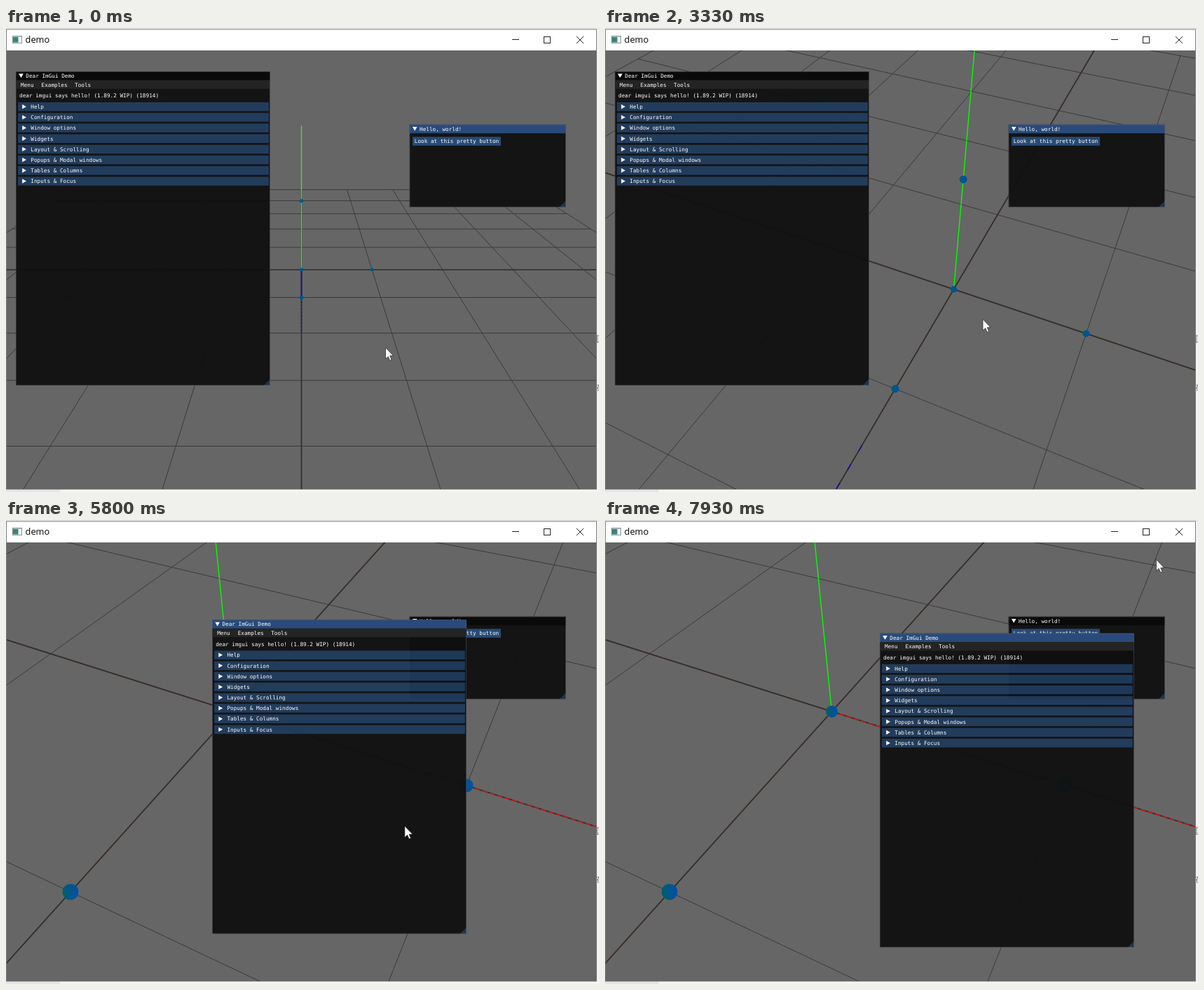
An HTML page with a canvas that plays this animation: 846 by 662 pixels, repeating every 8 s.

```html
<!DOCTYPE html>
<html lang="en">
<head>
<meta charset="utf-8">
<title>demo</title>
<style>
html, body { margin: 0; width: 100%; height: 100%; overflow: hidden; background: #f2f2f2; }
canvas { display: block; }
</style>
</head>
<body>
<canvas id="stage" width="846" height="662"></canvas>
<script>
const g = document.getElementById('stage').getContext('2d');
const LOOP = 8000, FOCAL = 860, CX = 421.5, CY = 344.8, NEAR = 0.1;
const MONO = '7.69px "DejaVu Sans Mono", monospace';
const SECTIONS = ['Help', 'Configuration', 'Window options', 'Widgets', 'Layout & Scrolling',
  'Popups & Modal windows', 'Tables & Columns', 'Inputs & Focus'];

// azimuth and elevation in degrees, distance, screen offset of the origin
const VIEW = [0, 20.56, 8.544, 0, 0];
const ORBIT = [
  { from: 70, to: 1200, goal: [-0.57, 44.2, 8.544, 0, 0] },
  { from: 1270, to: 2330, goal: [25.8, 43.6, 8.544, 0, 0] },
  { from: 2530, to: 3330, goal: [25.8, 43.6, 4.54, 76, 28] },
  { from: 3530, to: 5000, goal: [25.8, 43.6, 2.545, -98, -71.6] }
];
const DRAG = [
  { from: 5470, to: 5800, goal: [293.5, 142.3] },
  { from: 5800, to: 6070, goal: [466, 168] },
  { from: 6400, to: 6670, goal: [351, 143] },
  { from: 6670, to: 6850, goal: [229, 134] },
  { from: 6850, to: 7200, goal: [351, 202] },
  { from: 7270, to: 7450, goal: [392, 161.7] }
];
const HAND = [
  { from: 70, to: 1200, goal: [527, 401] },
  { from: 1270, to: 3330, goal: [539, 415.5] },
  { from: 3730, to: 5070, goal: [527.5, 345] },
  { from: 5070, to: 5400, goal: [260, 352] }
];
const LEAVE = [
  { from: 7450, to: 7800, goal: [778, 39] },
  { from: 7800, to: 7930, goal: [786.5, 56.5] }
];

const mix = (a, b, u) => a.map((v, i) => v + (b[i] - v) * u);

function follow(start, moves, t) {
  return moves.reduce((pose, { from, to, goal }) =>
    mix(pose, goal, Math.min(1, Math.max(0, (t - from) / (to - from)))), start);
}

const demoPos = t => follow([14, 62], DRAG, t);

// the dragged window trails the pointer slightly
function pointerPos(t) {
  if (t < 5425) return follow([541.5, 456], HAND, t);
  const [x, y] = demoPos(t + 45);
  return follow([x + 246, y + 290], LEAVE, t);
}

function box(x, y, w, h, color) {
  g.fillStyle = color;
  g.fillRect(x, y, w, h);
}

function poly(points, color) {
  g.fillStyle = color;
  g.beginPath();
  points.forEach(p => g.lineTo(...p));
  g.closePath();
  g.fill();
}

function stroke(points, color, width) {
  g.strokeStyle = color;
  g.lineWidth = width;
  g.beginPath();
  points.forEach(p => g.lineTo(...p));
  g.stroke();
}

function label(text, x, y, color = '#fff', font = MONO) {
  g.font = font;
  g.fillStyle = color;
  g.fillText(text, x, y);
}

function makeCamera([azimuth, elevation, dist, ox, oy]) {
  const a = azimuth * Math.PI / 180, e = elevation * Math.PI / 180;
  const S = Math.sin(a), C = Math.cos(a), s = Math.sin(e), c = Math.cos(e);
  return {
    dist,
    view: ([x, y, z]) => [
      x * C - z * S + ox * dist / FOCAL,
      (x * S + z * C) * s - y * c + oy * dist / FOCAL,
      dist - (x * S + z * C) * c - y * s
    ],
    project: ([x, y, d]) => [CX + FOCAL * x / d, CY + FOCAL * y / d]
  };
}

function line3(cam, from, to, color, width, dash = []) {
  let a = cam.view(from), b = cam.view(to);
  if (a[2] < NEAR && b[2] < NEAR) return;
  const cut = (p, q) => mix(p, q, (NEAR - p[2]) / (q[2] - p[2]));
  if (a[2] < NEAR) a = cut(a, b);
  else if (b[2] < NEAR) b = cut(b, a);
  g.setLineDash(dash);
  stroke([cam.project(a), cam.project(b)], color, width);
  g.setLineDash([]);
}

function ball(cam, p) {
  const v = cam.view(p);
  if (v[2] < NEAR) return;
  const [x, y] = cam.project(v), r = 0.025 * FOCAL / v[2];
  const shade = g.createLinearGradient(x - r, y, x + r, y);
  shade.addColorStop(0.1, '#005c70');
  shade.addColorStop(0.9, '#0050a6');
  g.fillStyle = shade;
  g.beginPath();
  g.arc(x, y, r, 0, 7);
  g.fill();
}

function scene(t) {
  const cam = makeCamera(follow(VIEW, ORBIT, t)), O = [0, 0, 0];
  const far = cam.dist > 8, main = far ? '#333' : '#372d28';
  for (let i = -5; i <= 5; i++) {
    const color = i ? '#363636' : main, width = i ? 0.9 : 1.8;
    line3(cam, [-5, 0, i], [5, 0, i], color, width);
    line3(cam, [i, 0, -5], [i, 0, 5], color, width);
  }
  // the axes lie in the grid plane, so only parts of them show through
  if (t < 500) {
    line3(cam, O, [0, 0, 1], '#1a1490', 1.8);
    line3(cam, [0, 0, 1], [0, 0, 2], '#1a1490', 1.5, [3, 2]);
  } else if (!far) {
    line3(cam, [0, 0, 1.45], [0, 0, 2], '#1408b4', 1.5, [9, 22]);
  }
  if (cam.dist < 3.5) line3(cam, O, [2, 0, 0], '#d81414', 1.6, [7, 4]);
  line3(cam, O, [0, 2, 0], far ? '#3fe03f' : '#0f0', 1.4);
  [O, [1, 0, 0], [0, 1, 0], [0, 0, 1]].forEach(p => ball(cam, p));
}

function panel(x, y, w, h, title, active) {
  box(x, y, w, h, 'rgba(15,15,15,.94)');
  box(x, y, w, 12.4, active ? '#294a7a' : '#0a0a0a');
  poly([[x + w - 9, y + h], [x + w, y + h - 9], [x + w, y + h]], 'rgba(66,150,250,.25)');
  g.strokeStyle = 'rgba(110,110,128,.5)';
  g.lineWidth = 0.8;
  g.strokeRect(x + 0.3, y + 0.3, w - 0.6, h - 0.6);
  poly([[x + 4.2, y + 3.3], [x + 10.8, y + 3.3], [x + 7.5, y + 9]], '#fff');
  label(title, x + 14.3, y + 9);
}

function helloWindow(active) {
  panel(575.7, 137.8, 223, 117.8, 'Hello, world!', active);
  box(580, 155.3, 126, 12.6, '#274a75');
  label('Look at this pretty button', 582.8, 164.4);
}

function demoWindow(x, y, active) {
  panel(x, y, 362.7, 448, 'Dear ImGui Demo', active);
  box(x + 0.6, y + 12.4, 361.5, 12.3, '#242424');
  label('Menu', x + 7, y + 21.5);
  label('Examples', x + 36.5, y + 21.5);
  label('Tools', x + 84, y + 21.5);
  label('dear imgui says hello! (1.89.2 WIP) (18914)', x + 5, y + 37.2);
  SECTIONS.forEach((name, i) => {
    const top = y + 44 + i * 15.18;
    box(x + 3, top, 357.8, 12.5, 'rgba(66,150,250,.31)');
    poly([[x + 9.2, top + 3], [x + 15, top + 6.2], [x + 9.2, top + 9.4]], '#fff');
    label(name, x + 21.3, top + 9);
  });
}

function pointer(x, y) {
  const shape = [[0, 0], [0, 16], [3.7, 12.7], [6.2, 18.4], [8.6, 17.3], [6.2, 11.8], [11, 11.5]]
    .map(([px, py]) => [x + px, y + py]);
  poly(shape, '#fff');
  stroke([...shape, shape[0]], '#222', 0.7);
}

function frame() {
  box(0, 0, 846, 662, '#f4f4f4');
  box(0, 0, 846, 1.5, '#e4e4e4');
  box(0, 658, 77, 4, '#e6e4e8');
  const cjk = '11px "Noto Sans CJK SC", "Noto Sans CJK", sans-serif';
  label('国', 842, 447.5, '#777', cjk);
  label('在', 842, 516.5, '#777', cjk);
  box(0, 1.5, 843, 657, '#808080');
  box(1, 2.5, 841, 29.5, '#fff');

  box(9, 11, 14, 11, '#8a9696');
  box(10, 12.5, 12, 8.5, '#f2f5f5');
  box(10, 13, 7.5, 7.5, '#3a8278');
  label('demo', 27.6, 21, '#000', '12.8px "Open Sans", "Noto Sans", sans-serif');
  stroke([[722, 16.5], [732, 16.5]], '#222', 1);
  g.strokeRect(767.5, 12.5, 9, 9);
  stroke([[814, 12], [824, 22]], '#222', 1);
  stroke([[824, 12], [814, 22]], '#222', 1);
}

function draw(t) {
  frame();
  g.save();
  g.beginPath();
  g.rect(1, 32, 841, 626);
  g.clip();
  box(1, 32, 841, 626, '#666');
  scene(t);
  const dragged = t >= 5430;
  helloWindow(!dragged);
  demoWindow(...demoPos(t), dragged);
  pointer(...pointerPos(t));
  g.restore();
}

function tick(now) {
  draw(now % LOOP);
  requestAnimationFrame(tick);
}
draw(0);
requestAnimationFrame(tick);
</script>
</body>
</html>
```
